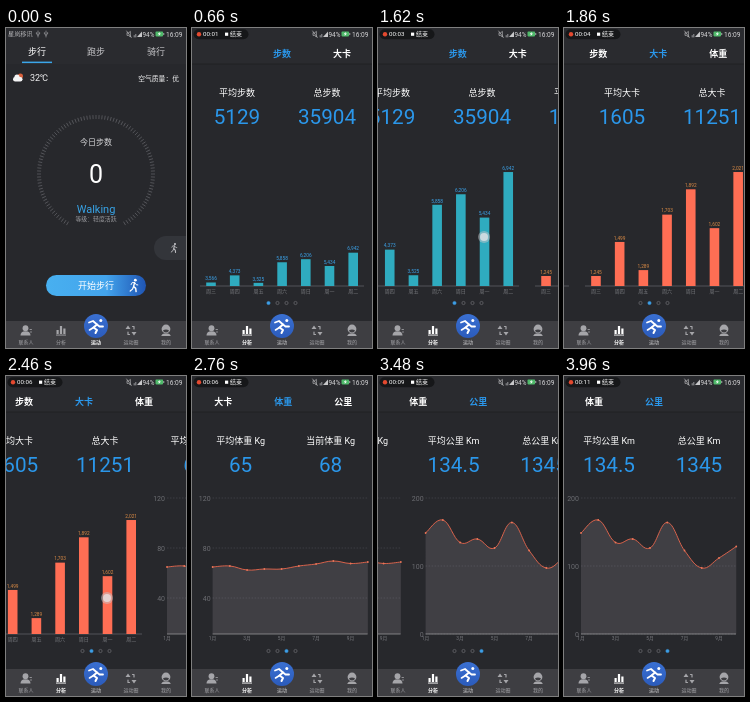
An HTML page for the animation above (5960 ms loop, 180 px wide and 320 px high).

```html
<!DOCTYPE html>
<html lang="zh">
<head>
<meta charset="utf-8">
<title>运动步数</title>
<style>
html, body { margin: 0; width: 100%; height: 100%; overflow: hidden; background: #27282c; }
svg { display: block; width: 100vw; height: 100vh; }
text { font-family: Roboto, "Noto Sans CJK SC", "Noto Sans CJK", sans-serif; }
</style>
</head>
<body>
<svg id="stage" viewBox="0 0 180 320"></svg>
<script>
const LOOP = 5960, STEP = 60, LAST = 3960;
const OPEN = 420, GROWN = 1080;
const BLUE = '#2b97ea', TEAL = '#2fabbf', CORAL = '#ff6e54', WHITE = '#f4f4f5', GREY = '#a5a5a9';
const BG = '#27282c', HEAD = '#2a2b2f', NAV = '#3e3e42';

// time, page position
const SCROLL = [[1440, 0], [1560, .09], [1620, .172], [1680, .35], [1740, .6], [1800, .8], [1860, .928], [1920, .98], [1980, 1],
  [2340, 1], [2400, 1.07], [2460, 1.2], [2520, 1.4], [2580, 1.64], [2640, 1.83], [2700, 1.93], [2760, 1.98], [2820, 2],
  [3120, 2], [3180, 2.03], [3240, 2.083], [3300, 2.2], [3360, 2.42], [3420, 2.65], [3480, 2.83], [3540, 2.94], [3600, 2.985], [3660, 3]];
// start, end, page, finger x, finger y
const DRAGS = [[1440, 1680, 0, 137, 209], [2280, 2520, 1, 137, 222], [3120, 3300, 2, 121, 224]];
const SECONDS = [60, 360, 720, 1080, 1740, 2100, 2400, 2820, 3120, 3420, 3660, 3900];

const stage = document.getElementById('stage');

function el(tag, attrs, parent = stage) {
  const node = document.createElementNS('http://www.w3.org/2000/svg', tag);
  for (const k in attrs) node.setAttribute(k, attrs[k]);
  return parent.appendChild(node);
}
const group = (parent = stage) => el('g', {}, parent);
const rect = (g, x, y, width, height, fill, rx = 0) => el('rect', { x, y, width, height, fill, rx }, g);
const circle = (g, cx, cy, r, fill) => el('circle', { cx, cy, r, fill }, g);
const shape = (g, d, fill) => el('path', { d, fill }, g);
const stroke = (g, d, color, width = 1) => el('path', {
  d, fill: 'none', stroke: color, 'stroke-width': width, 'stroke-linecap': 'round', 'stroke-linejoin': 'round' }, g);
const line = (g, d, color, width = .5) => el('path', { d, fill: 'none', stroke: color, 'stroke-width': width }, g);

// y is the middle of the glyphs
function text(g, str, x, y, size, fill = WHITE, weight = 400, anchor = 'middle') {
  const t = el('text', { x, y: y + size * .37, 'font-size': size, fill, 'font-weight': weight, 'text-anchor': anchor }, g);
  t.textContent = str;
  return t;
}
const show = (node, on) => node.setAttribute('visibility', on ? 'visible' : 'hidden');
const shift = (node, x) => node.setAttribute('transform', `translate(${x} 0)`);

function runner(g, x, y, s, color) {
  const r = el('g', { transform: `translate(${x} ${y}) scale(${s})` }, g);
  circle(r, 1.4, -5.6, 1.5, color);
  stroke(r, 'M-3 -1L-1.8 -3.2L.8 -3L2.4 -.8L4 -.6', color, 1);
  stroke(r, 'M.6 -3L-.4 1L1.8 3L2.2 6.4', color, 1.5);
  stroke(r, 'M-.4 1L-1.6 3.8L-4 5.8', color, 1.3);
}

/* Defs */
const defs = el('defs', {});
function gradient(id, stops, attrs = {}) {
  const g = el('linearGradient', { id, ...attrs }, defs);
  for (const [offset, color] of stops) el('stop', { offset, 'stop-color': color }, g);
}
gradient('button', [[0, '#48b0f0'], [.6, '#43a4ec'], [1, '#1f55b4']]);
gradient('ball', [[0, '#3a70d2'], [1, '#2b5bbb']], { x2: 0, y2: 1 });

/* Start screen */
rect(stage, 0, 0, 180, 320, BG);
const home = group();
rect(home, 0, 0, 180, 36, HEAD);
rect(home, 16, 33.6, 30, 1.5, '#3ba6ea');
text(home, '步行', 31, 23.5, 9, '#fff', 500);
text(home, '跑步', 90, 23.5, 9, '#c4c4c7');
text(home, '骑行', 150, 23.5, 9, '#c4c4c7');
circle(home, 14.4, 48, 2.6, '#d8603c');
rect(home, 7, 49, 9.5, 4.4, WHITE, 2.2);
circle(home, 11, 49.2, 2.6, WHITE);
text(home, '32℃', 33, 50, 9, WHITE);
text(home, '空气质量：优', 173, 50, 6.8, WHITE, 500, 'end');
for (let a = -150; a <= 150; a += 3)
  el('path', { d: 'M90 87V91', stroke: '#626368', 'stroke-width': .7, transform: `rotate(${a} 90 146)` }, home);
text(home, '今日步数', 90, 114, 8, '#d8d8da');
text(home, '0', 90, 146, 25, '#fff');
text(home, 'Walking', 90, 181, 11, '#37a3e6');
text(home, '等级：轻度活跃', 90, 191, 5.9, '#9a9a9e');
rect(home, 148, 208, 44, 24, '#33353a', 12);
runner(home, 168, 220, .7, '#c4c4c8');
rect(home, 40, 247, 100, 21, 'url(#button)', 10.5);
text(home, '开始步行', 90, 257.5, 9, '#fff');
runner(home, 128, 257.5, .95, '#fff');

/* Analysis screen */
const stats = group();
rect(stats, 0, 0, 180, 36, HEAD);
line(stats, 'M0 36H180', '#1f2023', .8);
const tabStrip = group(stats);
const tabs = ['步数', '大卡', '体重', '公里'].map((s, i) => text(tabStrip, s, 90 + 60 * i, 26, 9, '#fff', 700));

function page(i, unit, mean, total, totalName = '总' + unit) {
  const g = group(stats);
  text(g, '平均' + unit, 45, 65, 9, '#fff');
  text(g, totalName, 135, 65, 9, '#fff');
  text(g, mean, 45, 88, 20.7, BLUE);
  text(g, total, 135, 88, 20.7, BLUE);
  return g;
}

const DAYS = '三四五六日一二';
function barPage(g, values, low, lowTop, scale, fill, ink) {
  line(g, 'M8 258H172', '#65666b', .7);
  return values.map((v, i) => {
    const x = 19 + 23.7 * i;
    text(g, '周' + DAYS[i], x, 263.3, 5, '#77787d');
    const full = 258 - lowTop + (v - low) * scale;
    return { full, bar: rect(g, x - 4.8, 258 - full, 9.6, full, fill),
      label: text(g, v.toLocaleString('en-US'), x, 254 - full, 4.8, ink) };
  });
}

function linePage(g, ticks, ys) {
  for (const [v, y] of ticks) {
    text(g, v, 15, y, 7, '#6c6d72', 400, 'end');
    el('path', { d: `M17 ${y}H172`, stroke: '#515258', 'stroke-width': .5, 'stroke-dasharray': '1.5 1.5' }, g);
  }
  const pts = ys.map((y, i) => [17 + i * 17.25, y]);
  const at = i => pts[Math.max(0, Math.min(pts.length - 1, i))];
  const handle = (i, dir) => at(i).map((v, k) => v + dir * .2 * (at(i + 1)[k] - at(i - 1)[k]));
  let d = 'M' + pts[0];
  for (let i = 1; i < pts.length; i++) d += `C${handle(i - 1, 1)} ${handle(i, -1)} ${pts[i]}`;
  el('path', { d: d + 'V258H17Z', fill: '#a79ca3', 'fill-opacity': .2 }, g);
  line(g, 'M17 258H172', '#88888c', .9);
  line(g, d, '#e0654c', .95);
  pts.forEach(([x, y]) => circle(g, x, y, .9, '#ec7658'));
  for (let i = 0; i < 5; i++) text(g, 2 * i + 1 + '月', 17 + 34.5 * i, 262.5, 4.8, '#77787d');
}

const pages = [page(0, '步数', '5129', '35904'), page(1, '大卡', '1605', '11251'),
  page(2, '体重 Kg', '65', '68', '当前体重 Kg'), page(3, '公里 Km', '134.5', '1345')];
const bars = barPage(pages[0], [3566, 4373, 3525, 5858, 6206, 5434, 6942], 3566, 246, .0302, TEAL, '#3ba3ea');
barPage(pages[1], [1245, 1499, 1289, 1703, 1892, 1602, 2021], 1245, 248, .134, CORAL, '#d98a45');
linePage(pages[2], [[120, 122], [80, 172], [40, 222]], [191, 190, 194, 193, 193, 190, 188, 185, 187.5, 186]);
linePage(pages[3], [[200, 122], [100, 190], [0, 258]], [157, 144, 166.5, 163, 172, 146.5, 174.5, 192, 182, 170.5]);
const dots = [0, 1, 2, 3].map(i => el('circle', { cx: 76.5 + 9 * i, cy: 275, r: 1.6, 'stroke-width': .6 }, stats));

/* Bottom bar */
rect(stage, 0, 293, 180, 27, NAV);
const items = [['联系人', 20], ['分析', 55], ['运动', 90], ['运动圈', 125], ['我的', 160]]
  .map(([s, x]) => text(stage, s, x, 314, 5, GREY));
circle(stage, 19.5, 300.2, 2.9, GREY);
shape(stage, 'M14.5 307.5Q14.5 303.2 19.5 303.2Q24.5 303.2 24.5 307.5Z', GREY);
stroke(stage, 'M24 301.5H25.5M24.5 304H25.5', GREY, .8);
const chartIcon = group();
[[50.5, 4], [53.9, 8], [57.3, 5.5]].forEach(([x, h]) => rect(chartIcon, x, 306 - h, 2.2, h, 'currentColor'));
rect(chartIcon, 50, 306.6, 10, .9, 'currentColor');
shape(stage, 'M119.5 301L122 297.5L124.5 301ZM125.5 304L128 307.5L130.5 304Z', GREY);
stroke(stage, 'M122 304V306.5H123.5M128 301V298.5H126.5', GREY, 1.2);
circle(stage, 160, 301, 4.4, GREY);
shape(stage, 'M157 302.2Q160 301 163 302.2Q162.6 304.4 160 304.4Q157.4 304.4 157 302.2Z', NAV);
shape(stage, 'M155.2 308Q156 305.6 158 305.4H162Q164 305.6 164.8 308Z', GREY);
circle(stage, 90, 298, 12, 'url(#ball)');
circle(stage, 94.8, 292.6, 1.5, '#fff');
stroke(stage, 'M83 294.5L87 293L91 296.5L93.5 298.5H97', '#fff', 1.8);
stroke(stage, 'M91 296.5L87.5 299.5L91 302L89.5 305', '#fff', 2);
stroke(stage, 'M87.5 299.5L83.5 302', '#fff', 1.6);

/* Status bar */
const carrier = group();
text(carrier, '星岚移讯', 2, 6, 6.2, '#b4b4b7', 400, 'start');
[32, 40].forEach(x =>
  stroke(carrier, `M${x} 3V9M${x - 1.6} 4.6V6L${x} 7.4L${x + 1.6} 6V4.6`, '#b4b4b7', .6));
const recorder = group();
rect(recorder, 1.5, 1.2, 55, 10, '#161719', 5);
circle(recorder, 7, 6.2, 2.2, '#e4492f');
const clock = text(recorder, '', 11, 6.2, 6.2, '#fff', 400, 'start');
rect(recorder, 33, 4.6, 3.2, 3.2, '#fff');
text(recorder, '结束', 44, 6.2, 6, '#fff');
stroke(stage, 'M121 5V7.4H122.4L124.4 9V3.4L122.4 5ZM120.6 3L125.4 9.4', '#c8c8ca', .6);
shape(stage, 'M131 9L136 3.4V9Z', '#c8c8ca');
stroke(stage, 'M128.2 9V7.6M129.8 9V6.4', '#c8c8ca', .7);
text(stage, '94%', 142.4, 6.2, 6.4, '#d8d8da');
rect(stage, 149.5, 3.6, 7.6, 4.8, '#4fb96a', .8);
shape(stage, 'M153.8 3.9L151.6 6.3H153L152.6 8.1L155 5.6H153.5Z', '#fff');
rect(stage, 157.4, 5, .8, 2, '#c8c8ca');
text(stage, '16:09', 176.5, 6.2, 6.6, '#d8d8da', 400, 'end');

/* Finger mark */
const finger = group();
circle(finger, 0, 0, 6, '#c8c8cb').setAttribute('opacity', .5);
circle(finger, 0, 0, 4, '#e6e6e8').setAttribute('opacity', .75);

function lerp(table, t) {
  if (t <= table[0][0]) return table[0][1];
  for (let i = 1; i < table.length; i++) {
    const [a, u] = table[i - 1], [b, v] = table[i];
    if (t <= b) return u + (v - u) * (t - a) / (b - a);
  }
  return table[table.length - 1][1];
}

function touch(t, p) {
  if (t >= 240 && t < OPEN) return [55, 302];
  const d = DRAGS.find(d => t >= d[0] && t <= d[1]);
  return d && [d[3] - 180 * (p - d[2]), d[4]];
}

function draw(t) {
  const open = t >= OPEN, p = lerp(SCROLL, t), current = Math.round(p);
  show(home, !open);
  show(stats, open);
  show(carrier, t < STEP);
  show(recorder, t >= STEP);
  const sec = Math.max(0, SECONDS.filter(s => s <= t).length - 1);
  clock.textContent = '00:' + String(sec).padStart(2, '0');

  shift(tabStrip, -60 * p);
  tabs.forEach((tab, i) => tab.setAttribute('fill', i === current ? BLUE : '#fff'));
  pages.forEach((g, i) => shift(g, 180 * (i - p)));
  dots.forEach((dot, i) => {
    dot.setAttribute('fill', i === current ? '#3d9fe8' : 'none');
    dot.setAttribute('stroke', i === current ? '#3d9fe8' : '#77787d');
  });

  const k = Math.max(0, Math.min(1, (t - OPEN) / (GROWN - OPEN)));
  const grow = (1 - Math.cos(Math.PI * k)) / 2;
  for (const { full, bar, label } of bars) {
    const h = full * grow;
    bar.setAttribute('y', 258 - h);
    bar.setAttribute('height', h);
    label.setAttribute('y', 255.8 - h);
  }

  items[1].setAttribute('fill', open ? '#fff' : GREY);
  items[1].setAttribute('font-weight', open ? 700 : 400);
  items[2].setAttribute('fill', open ? '#d6d6d8' : '#fff');
  items[2].setAttribute('font-weight', open ? 400 : 700);
  chartIcon.setAttribute('color', open ? '#fff' : GREY);

  const at = touch(t, p);
  show(finger, at);
  if (at) finger.setAttribute('transform', `translate(${at})`);
}

const start = performance.now();
function tick() {
  const t = (performance.now() - start) % LOOP;
  draw(Math.min(LAST, Math.floor(t / STEP) * STEP));
  requestAnimationFrame(tick);
}
tick();
</script>
</body>
</html>
```
